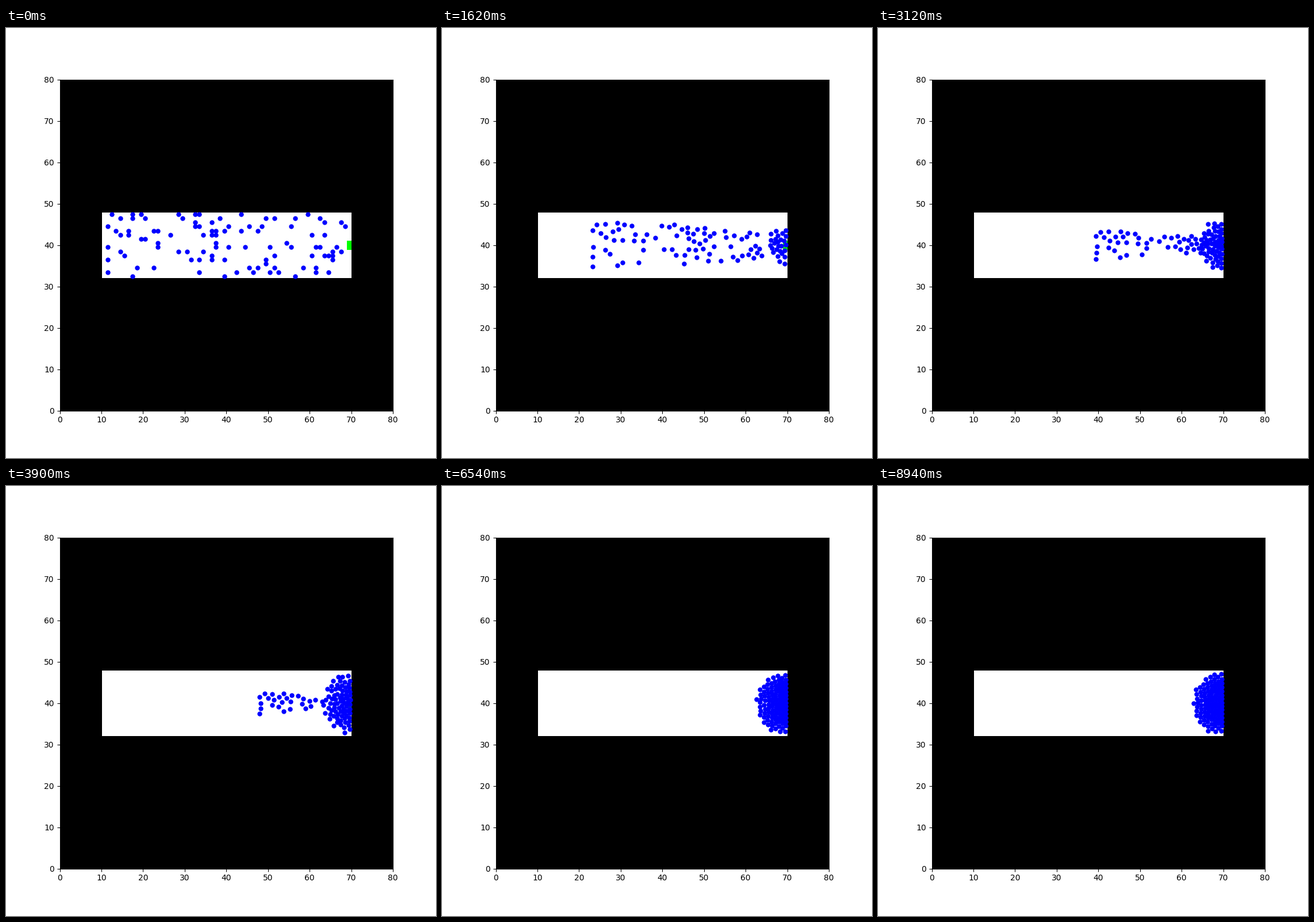
A matplotlib script for the animation above (9 s loop, 748 by 748 pixels).

```python
import numpy as np
import matplotlib.pyplot as plt
from matplotlib.animation import FuncAnimation
from matplotlib.patches import Rectangle

FRAMES, INTERVAL = 150, 60
SUBSTEPS = 10
SPEED, TAU = 0.667, 10.0                     # cells per frame, frames
PUSH, RANGE, RADIUS = 0.086, 0.1, 0.5        # repulsion between bodies
LEFT, RIGHT, BOTTOM, TOP = 10, 70, 32, 48
EXIT = np.array([70.0, 40.0])

# Occupied cells of the corridor, row by row
ROWS = {
    47: (12, 17, 19, 28, 32, 33, 43, 59),
    46: (14, 17, 20, 29, 38, 49, 51, 56, 62),
    45: (32, 36, 63, 67),
    44: (11, 32, 33, 40, 45, 48, 55, 68),
    43: (13, 16, 22, 23, 36, 37, 39, 43, 47),
    42: (14, 16, 26, 34, 36, 37, 60, 63),
    41: (19, 20),
    40: (23, 37, 54),
    39: (11, 23, 37, 40, 44, 50, 55, 61, 62, 66),
    38: (14, 28, 30, 34, 65, 67),
    37: (15, 36, 51, 60, 63, 64, 65),
    36: (11, 31, 33, 36, 39, 49, 65),
    35: (49,),
    34: (18, 22, 45, 47, 51, 58, 61),
    33: (11, 33, 42, 46, 50, 52, 61, 64),
    32: (17, 39, 56),
}


def repulsion(gap):
    """Push of two surfaces, where a negative gap is an overlap."""
    return PUSH * np.exp(np.clip(-gap / RANGE, -50, 4))


def acceleration(pos, vel):
    aim = EXIT - pos
    dist = np.linalg.norm(aim, axis=1, keepdims=True)
    acc = (SPEED * aim / np.maximum(dist, 0.3) - vel) / TAU

    diff = pos[:, None] - pos[None]
    sep = np.sqrt((diff ** 2).sum(axis=2)) + 1e-9
    push = repulsion(sep - 2 * RADIUS)
    np.fill_diagonal(push, 0)
    acc += (diff * (push / sep)[..., None]).sum(axis=1)

    x, y = pos.T
    acc[:, 0] += repulsion(x - LEFT - RADIUS) - repulsion(RIGHT - x - RADIUS)
    acc[:, 1] += repulsion(y - BOTTOM - RADIUS) - repulsion(TOP - y - RADIUS)
    return acc


def simulate():
    pos = np.array([(x + 0.5, y + 0.5) for y, row in ROWS.items() for x in row])
    vel = np.zeros_like(pos)
    dt = 1 / SUBSTEPS
    path = [pos.copy()]
    for _ in range(FRAMES - 1):
        for _ in range(SUBSTEPS):
            vel += acceleration(pos, vel) * dt
            pos += vel * dt
            pos[:, 0] = np.minimum(pos[:, 0], RIGHT - 0.25)
        path.append(pos.copy())
    return path


path = simulate()

fig, ax = plt.subplots(figsize=(7.48, 7.48), dpi=100)
ax.set_facecolor("black")
ax.set_xlim(0, 80)
ax.set_ylim(0, 80)
ax.add_patch(Rectangle((10.1, 32), 59.9, 15.9, color="white", lw=0))
ax.add_patch(Rectangle((69, 38.9), 1, 2.15, color="lime", lw=0))
dots, = ax.plot([], [], "o", color="blue", markersize=5)


def draw(frame):
    dots.set_data(*path[frame].T)
    return dots,


anim = FuncAnimation(fig, draw, frames=FRAMES, interval=INTERVAL,
                     repeat=True, repeat_delay=0)
plt.show()
```
